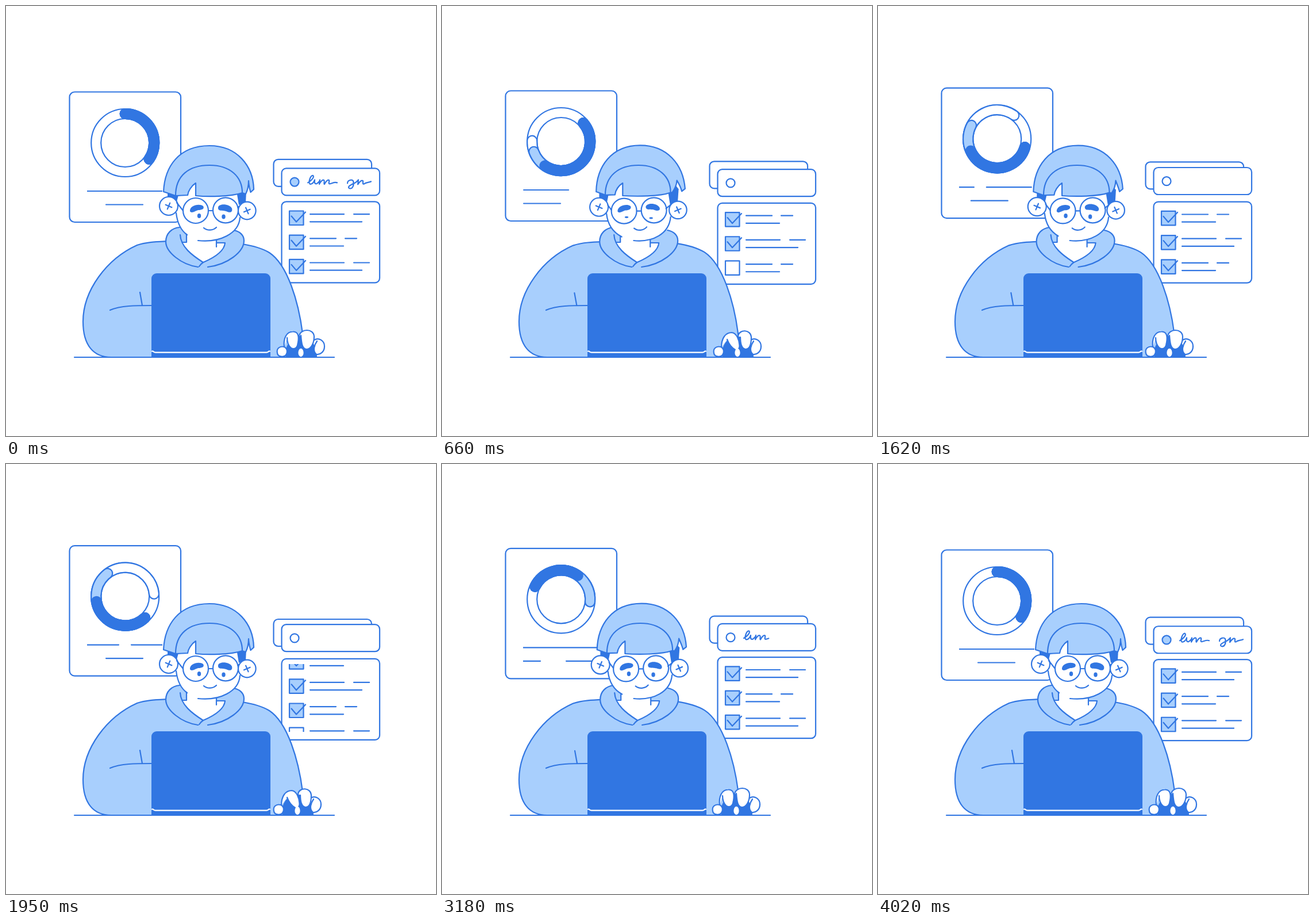
These frames come from a looping animation (748 by 748 pixels, 4.05 s). An HTML page with a canvas:

```html
<!DOCTYPE html>
<html lang="en">
<head>
<meta charset="utf-8">
<title>Working at a laptop</title>
<style>
html, body { margin: 0; width: 100%; height: 100%; overflow: hidden; background: #fff; }
canvas { display: block; width: 748px; height: 748px; }
</style>
</head>
<body>
<canvas id="stage" width="748" height="748"></canvas>
<script>
const ctx = document.getElementById('stage').getContext('2d');
const LOOP = 4050, BLUE = '#3176e2', SKY = '#a8cffd', WHITE = '#fff', LINE = 2.2;

// ---- timing helpers ----
const lerp = (a, b, k) => a + (b - a) * k;
const clamp = v => Math.max(0, Math.min(1, v));
const ease = (t, a, b) => { const k = clamp((t - a) / (b - a)); return k * k * (3 - 2 * k); };
const bob = (t, mid, amp, peak) => mid + amp * Math.cos((t - peak) / LOOP * 2 * Math.PI);

// Smooth monotone curve through time/value pairs
function curve(...k) {
  const n = k.length / 2, X = i => k[2 * i], Y = i => k[2 * i + 1];
  const slope = i => (Y(i + 1) - Y(i)) / (X(i + 1) - X(i));
  const tangent = i => {
    if (i < 1 || i > n - 2) return 0;
    const a = slope(i - 1), b = slope(i);
    return a * b > 0 ? 2 * a * b / (a + b) : 0;
  };
  return t => {
    if (t <= X(0)) return Y(0);
    if (t >= X(n - 1)) return Y(n - 1);
    let i = 0;
    while (t > X(i + 1)) i++;
    const h = X(i + 1) - X(i), u = (t - X(i)) / h, v = 1 - u;
    return Y(i) * v * v * (1 + 2 * u) + Y(i + 1) * u * u * (3 - 2 * u)
      + h * u * v * (tangent(i) * v - tangent(i + 1) * u);
  };
}

// ---- drawing helpers ----
// Blend two path strings of the same structure
function mix(a, b, k) {
  const other = b.match(/-?[\d.]+/g);
  let i = 0;
  return a.replace(/-?[\d.]+/g, v => lerp(+v, +other[i++], k).toFixed(2));
}
function draw(d, fill, stroke = BLUE, width = LINE) {
  const p = typeof d === 'string' ? new Path2D(d) : d;
  if (fill) { ctx.fillStyle = fill; ctx.fill(p); }
  if (stroke) { ctx.strokeStyle = stroke; ctx.lineWidth = width; ctx.stroke(p); }
}
function oval(x, y, rx, ry, fill, stroke) {
  const p = new Path2D();
  p.ellipse(x, y, rx, ry, 0, 0, 7);
  draw(p, fill, stroke);
}
function box(x, y, w, h, r, fill, stroke) {
  const p = new Path2D();
  p.roundRect(x, y, w, h, r);
  draw(p, fill, stroke);
}
const hline = (a, b, y) => draw(`M${a} ${y}H${b}`);
function at(x, y, fn) {
  ctx.save();
  ctx.translate(x, y);
  fn();
  ctx.restore();
}
function clipTo(x, y, w, h) {
  ctx.beginPath();
  ctx.rect(x, y, w, h);
  ctx.clip();
}
function trimmed(d, len, k) {
  if (k <= 0) return;
  ctx.save();
  if (k < 1) ctx.setLineDash([len * k, len * 2]);
  draw(d);
  ctx.restore();
}

// ---- chart panel ----
const ring = {
  start: curve(0, -90, 660, -40, 1230, -36, 1900, 47, 2400, 47, 3180, 206, 3900, 270),
  dark: curve(0, 34, 660, 124, 1230, 129, 1900, 170, 2400, 170, 3180, 305, 3900, 394),
  light: curve(0, 34, 660, 160, 1230, 164, 1900, 233, 2400, 233, 3180, 365, 3900, 394),
  pale: curve(0, 34, 660, 182, 1230, 210, 1900, 355, 2400, 355, 3180, 365, 3900, 394)
};
const slideA = curve(0, 0, 640, 150, 1230, 152, 1920, 226, 2400, 226, 3180, 315, 3900, 339);
const slideB = curve(0, 0, 640, 110, 1230, 111, 1920, 142, 2400, 142, 3180, 184, 3900, 251);

function arc(a, b, fill) {
  const p = new Path2D();
  p.arc(0, 0, 50.5, a * Math.PI / 180, b * Math.PI / 180);
  draw(p, null, BLUE, 17 + LINE);
  draw(p, null, fill, 17 - LINE);
}
function chart(t) {
  at(0, bob(t, 145.8, 3.7, 4010), () => {
    box(110.5, 0, 193.5, 226.5, 9, WHITE, BLUE);
    at(207.2, 88.5, () => {
      oval(0, 0, 59, 59, WHITE, BLUE);
      oval(0, 0, 42, 42, WHITE, BLUE);
      const s = ring.start(t);
      arc(s, ring.pale(t), WHITE);
      arc(s, ring.light(t), SKY);
      arc(s, ring.dark(t), BLUE);
    });
    clipTo(141, 165, 131, 40);
    const a = slideA(t), b = slideB(t);
    [[130, 310], [-8, 70], [-210, -30]].forEach(([l, r]) => hline(l + a, r + a, 172.5));
    [[174, 238], [32, 96], [-77, -13]].forEach(([l, r]) => hline(l + b, r + b, 196));
  });
}

// ---- cards on the right ----
const words = [
  'M525 25C531 22 537 15 534 12.5C530 11 525 25 529 27.5C533 28 536 23 537 20C536 26 538 28 541 26.5C544 24 546 21 546 20L545 27.5C548 22 551 19.5 553 20.5C555 22.5 552 27 554 27.5C557 22 560 19.5 562 20.5C563 23 560 27 563 27C567 26.5 571 23 576 25',
  'M594 26C594 20 602 19 604 22C606 29 603 36 598 35C592 33 600 28 606 26C610 24 612 21 613 20L612 28C616 22 619 20 621 22C621 26 620 28 623 27C627 24 630 25 635 23'
].map(d => {
  const el = document.createElementNS('http://www.w3.org/2000/svg', 'path');
  el.setAttribute('d', d);
  return { d, len: el.getTotalLength() };
});
const backY = t => bob(t, 268.2, 3.6, 1275);
const frontY = t => bob(t, 280.6, 3.6, 680);
const listY = t => bob(t, 339.4, 3.6, 850);

function note(t) {
  box(465.5, backY(t), 170.5, 47, 8, WHITE, BLUE);
  at(0, frontY(t), () => {
    box(479.5, 0, 170.5, 47, 8, WHITE, BLUE);
    const dot = t < 2000 ? 1 - ease(t, 200, 560) : ease(t, 3680, 3880);
    if (dot > 0) oval(502, 23.7, 7.5 * dot, 7.5 * dot, SKY, null);
    oval(502, 23.7, 7.5, 7.5, null, BLUE);
    if (t < 2000) {
      const out = ease(t, 60, 530);
      ctx.globalAlpha = 1 - out;
      ctx.translate(22 * out, 0);
      if (out < 1) words.forEach(w => draw(w.d));
    } else {
      trimmed(words[0].d, words[0].len, clamp((t - 2800) / 410));
      trimmed(words[1].d, words[1].len, clamp((t - 3240) / 410));
    }
  });
}
function row(y, long, done) {
  const p = new Path2D();
  p.rect(493, y, 24.5, 24.5);
  if (done > 0) {
    ctx.globalAlpha = done;
    draw(p, SKY, null);
    ctx.globalAlpha = 1;
  }
  draw(p, null);
  trimmed(`M496.5 ${y + 9}L505 ${y + 19}L521 ${y + 2}`, 36.5, done * 1.15);
  const [a, b, c, d] = long ? [588, 605, 632, 619] : [574, 590, 610, 587];
  hline(529, a, y + 5.6);
  hline(b, c, y + 5.6);
  hline(529, d, y + 18.8);
}
function list(t) {
  const scroll = ease(t, 120, 620) + ease(t, 1670, 2200);
  const done = [1, 1, 1, ease(t, 1120, 1330), ease(t, 2560, 2780)];
  at(0, listY(t), () => {
    box(479.5, 0, 170.5, 141, 8, WHITE, BLUE);
    clipTo(485, 9, 160, 118);
    done.forEach((k, i) => row(16.2 + (i - scroll) * 42.2, i % 2 === 0, k));
  });
}

// ---- person ----
const pose = curve(0, 1, 200, .96, 660, .42, 1120, 0, 1250, 0, 1880, 1, 2100, 1, 2400, .9,
  2880, .48, 3180, .57, 3800, 1);
const handX = curve(0, 0, 660, 1, 1230, -6, 1950, -6, 2400, 3, 3180, -1, 3950, 0);
const press = curve(0, 0, 180, 0, 400, 1, 700, 1, 860, 0, 1640, 0, 1800, 1, 2060, 1, 2220, 0);
const lids = curve(0, 1, 520, 1, 600, 0, 630, 0, 690, .85, 740, 1, 2280, 1, 2370, 0, 2430, 0, 2530, 1);

function body(k) {
  draw(mix('M183 611C152 611 134 590 134 549C134 495 175 440 228 416C245 410 265 410 284 409L410 414C430 417 445 421 458 429C490 450 509 515 516 570L518 611Z',
    'M183 611C152 611 134 590 134 549C134 495 175 440 228 417C245 412 260 411 277 411L405 412C425 415 443 420 456 428C488 450 507 515 514 567L516 611Z', k), SKY);
  draw('M181 529C200 521 225 521 253 521');
  draw(mix('M233 498L237 521', 'M228.5 500L232.5 521', k));
}
function hood(k) {
  at(-6.5 * k, 0, () => {
    const left = 'M302 385C288 386 278 396 278 410C278 428 305 450 334 454';
    const right = '351 454C385 450 414 428 414 408C414 399 407 392 396 390';
    draw(left + 'L' + right + 'Z', SKY, null);
    draw(left + 'M' + right);
    draw('M314 395V411H307C313 427 330 438 343 446C364 437 380 425 381 412H366V395Z', WHITE, null);
    draw('M303 398C304 419 324 434 343 446C340 448 338 450 336 453M314 397V411H308M343 446C364 437 380 425 381 412H366M366 407V419');
  });
}
function ear(x, y, r, turn) {
  oval(x, y, r, r, WHITE, BLUE);
  at(x, y, () => {
    ctx.rotate(turn);
    draw('M-5.8 0H5.8M0 -5.8V5.8');
  });
}
function head(t, k) {
  const blend = (a, b, fill, stroke) => draw(mix(a, b, k), fill, stroke);
  const m = (a, b) => lerp(a, b, k);

  blend('M297 325L296 360C298 378 304 390 315 398L334 408C372 412 405 396 407 368L405 325Z',
    'M280 325L279 362C281 380 292 396 311 404L333 408C362 411 388 397 391 366L389 325Z', WHITE, null);
  blend('M296 360C298 378 304 390 315 398M334 408C372 412 405 396 407 368',
    'M279 362C281 380 292 396 311 404M333 408C362 411 388 397 391 366');
  // side hair
  blend('M281 326L300 329L296 344L281 336Z', 'M268 324L282 329L280 342L268 338Z', BLUE, null);
  blend('M402 328L412 318L418 322L417 342L405 346Z', 'M387 320L399 303L407 316L405 341L391 347Z', BLUE, null);
  // cap of hair
  blend('M274 323C276 280 300 243 354 243C402 243 430 278 431 319L425.5 324C424 318 422 312 422 304C422 315 420 321 417 327L411 325L330 326L295 330Z',
    'M264 323C264 280 290 242 338 242C385 242 412 275 417 317L411 321C409 312 405 307 399 303C398 310 394 317 388 323L388 324L303 326L276 328Z', SKY);
  // forehead gap, then the fringe
  blend('M312 332L330 306L332 332Z', 'M286 331L303 306L304 331Z', WHITE, null);
  blend('M295 330C295 295 318 277 354 277C390 277 411 297 411 325C390 332 350 332 330 330L330 308C322 313 317 322 316 329Z',
    'M276 328C276 295 300 277 333 277C368 277 388 297 388 324C370 331 330 331 303 330L303 308C295 313 291 321 290 328Z', SKY);

  ear(m(283, 266), m(348, 351), 16, .4);
  ear(m(419.3, 404), m(356, 354), 15.3, -.4);

  // glasses
  oval(m(330, 307), m(356, 357), 22, 22, WHITE, BLUE);
  oval(m(382, 359), 355.3, 22, 22, WHITE, BLUE);
  blend('M352 356H360M297 342L308 356M403 350L405 349', 'M329 357H337M282 349L285 354M380 354L393 343');
  blend('M320 357C319 347 336 343 343 348C346 353 340 355 335 355C329 356 323 362 320 357Z',
    'M295 358C294 348 311 343 317 348C320 353 313 356 308 356C303 357 298 362 295 358Z', BLUE, null);
  blend('M369 350C371 343 389 344 393 352C395 360 388 360 383 357C377 355 368 358 369 350Z',
    'M344 348C347 340 365 342 368 350C370 355 364 354 359 353C353 352 344 355 344 348Z', BLUE, null);

  const open = lids(t);
  if (open > .02) [[m(336, 310.3), 365], [m(378.5, 353), 366.5]].forEach(([x, y]) =>
    oval(x, y + 4 * (1 - open), 3.2, 4 * open, BLUE, null));
  blend('M344 386C350 391 360 391 366 385', 'M327 387C333 392 344 391 349 384');
}
function laptop() {
  box(253, 465, 207, 146, [9, 9, 0, 0], BLUE, null);
  draw('M254 600.5C257 600 256 602.6 260 602.6H453C457 602.6 456 600 459 600.5', null, WHITE);
}
function hand(t) {
  const q = press(t);
  at(handX(t), 0, () => {
    draw('M487 611C483 597 492 576 512 574C532 576 541 592 541 611Z', BLUE, null);
    draw('M536 581C544 576 554 582 554 592C554 602 546 607 540 606C533 600 536 590 541 583', WHITE);
    draw(mix('M484 594C482 578 488 566.5 499 566.5C510 566 510 578 507 590C505 597 499 597 496 595C490 590 489 582 489 577',
      'M485 594C485 578 492 568 503 568C512 569 516 582 516.5 590C517 597 513 599 509 598C502 594 498 588 495 580', q), WHITE);
    draw(mix('M510 574C512 561 535 560 536 575C536 586 531 597 523 597C515 597 514 586 513 573',
      'M514 574C516 562 536 562 537 576C537 588 534 597 527 597C520 596 518 586 518 576', q), WHITE);
    draw('M472 604C470 596 476 591 484 593C490 596 490 603 487 607C484 611 473 611 472 604Z', WHITE);
    oval(513, 603, 4.6, 7.2, WHITE, null);
  });
}

function frame(now) {
  const t = now % LOOP, k = 1 - pose(t);
  ctx.fillStyle = WHITE;
  ctx.fillRect(0, 0, 748, 748);
  ctx.lineCap = ctx.lineJoin = 'round';
  chart(t);
  note(t);
  list(t);
  body(k);
  hood(k);
  head(t, k);
  laptop();
  hand(t);
  hline(119, 571, 611);
}
const begin = performance.now();
function tick() {
  frame(performance.now() - begin);
  requestAnimationFrame(tick);
}
tick();
</script>
</body>
</html>
```
